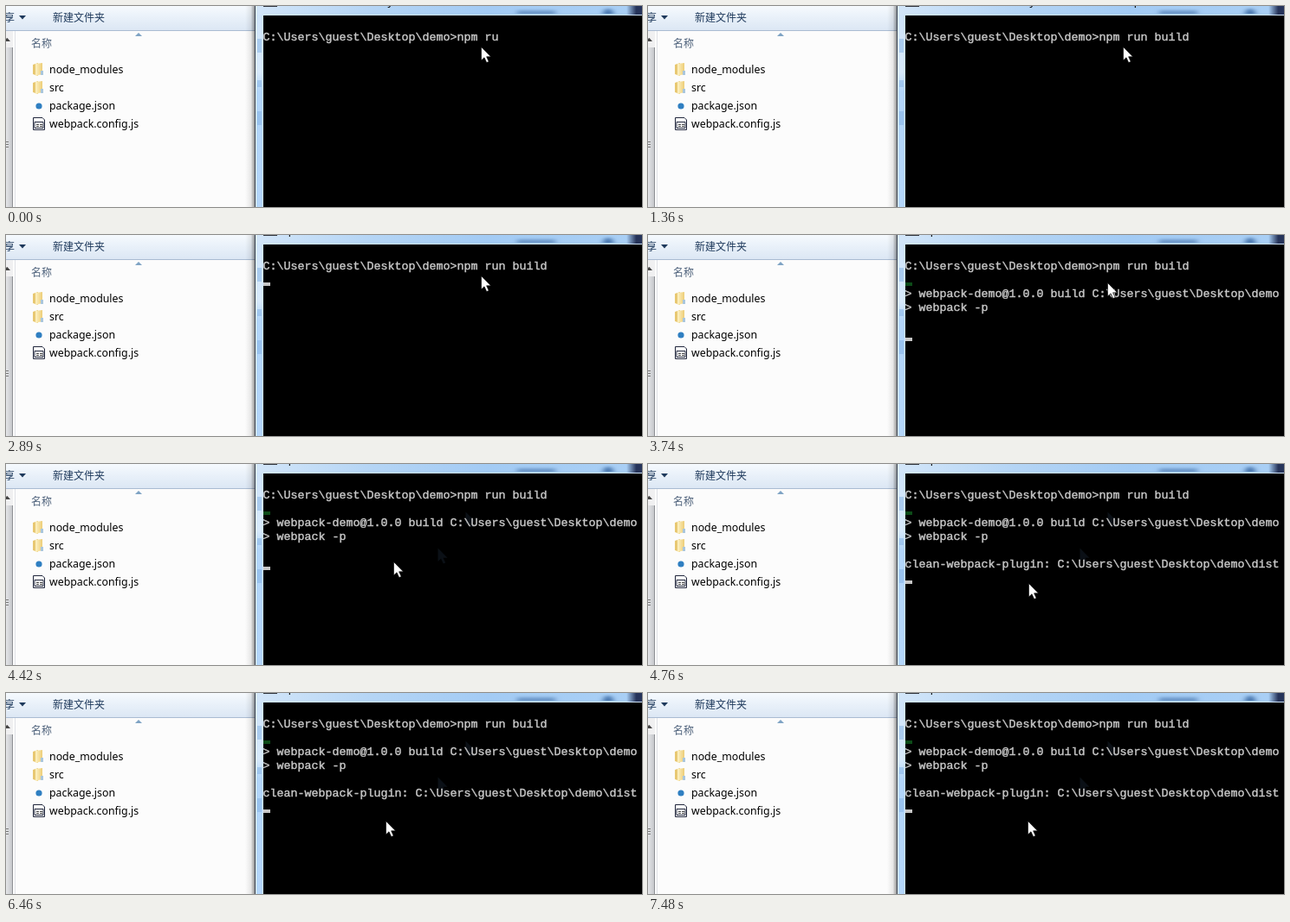
Animation of 734 by 233 pixels, one loop 7990 ms. Source, as an HTML page:

```html
<!DOCTYPE html>
<html lang="zh">
<head>
<meta charset="utf-8">
<title>npm run build</title>
<style>
html, body { margin: 0; width: 100%; height: 100%; overflow: hidden; background: #fff; }
svg { display: block; width: 734px; height: 233px; }
text { white-space: pre; }
.zh { font: 12px "Noto Sans CJK SC", "Noto Sans CJK", sans-serif; fill: #1e395b; }
.file { font: 12.35px "Noto Sans", sans-serif; fill: #000; }
.con { font: 13.333px "Liberation Mono", monospace; fill: #c6c6c6; stroke: #c6c6c6; stroke-width: .45px; }
</style>
</head>
<body>
<svg viewBox="0 0 734 233">
  <defs>
    <linearGradient id="bar" x2="0" y2="1">
      <stop stop-color="#f6fafe"/><stop offset=".5" stop-color="#e8f0f9"/><stop offset="1" stop-color="#dce7f4"/>
    </linearGradient>
    <linearGradient id="shade">
      <stop stop-color="#000" stop-opacity="0"/><stop offset=".6" stop-color="#000" stop-opacity=".08"/><stop offset="1" stop-color="#000" stop-opacity=".4"/>
    </linearGradient>
    <linearGradient id="glass">
      <stop stop-color="#d3e6f9"/><stop offset=".3" stop-color="#b5d5f5"/><stop offset=".6" stop-color="#a3cbf4"/><stop offset=".96" stop-color="#a9cff5"/><stop offset=".985" stop-color="#26345a"/>
    </linearGradient>
    <linearGradient id="side" x2="0" y2="1">
      <stop stop-color="#cfe4fa"/><stop offset=".3" stop-color="#d8eafb"/><stop offset=".4" stop-color="#b2d5f9"/><stop offset="1" stop-color="#b4d6fa"/>
    </linearGradient>
    <linearGradient id="thumb">
      <stop stop-color="#e4e5e8"/><stop offset="1" stop-color="#c6c8cc"/>
    </linearGradient>
    <linearGradient id="paper">
      <stop stop-color="#fdf2c4"/><stop offset="1" stop-color="#edcd77"/>
    </linearGradient>
    <filter id="blur"><feGaussianBlur stdDeviation="3 1.5"/></filter>
    <g id="folder">
      <path d="M1 2 7 0V15L1 13Z" fill="#e8c872"/>
      <path d="M4 1 12 0V13L4 15Z" fill="url(#paper)"/>
      <path d="M10 9H13V14H10Z" fill="#a9c6dd"/>
    </g>
    <path id="arrow" d="M.5 .5V16L4 12.8 6.7 18.6 9.2 17.5 6.6 11.8H11.5Z"/>
    <clipPath id="screen"><path d="M297 11H734V233H297Z"/></clipPath>
    <clipPath id="top"><path d="M288 0H734V9H288Z"/></clipPath>
  </defs>

  <!-- file list -->
  <path d="M0 0H288V233H0Z" fill="#fcfcfc"/>
  <path d="M0 0H288V28H0Z" fill="url(#bar)"/>
  <path d="M0 28.5H288" stroke="#a9bbd2"/>
  <path d="M0 29H8V233H0Z" fill="#f0f0f1"/>
  <path d="M0 48H7V233H0Z" fill="url(#thumb)"/>
  <path d="M7.5 48V233" stroke="#8f9195"/>
  <path d="M10.5 29V233" stroke="#dfe2e6"/>
  <path d="M0 41V38L1.5 37 5 41Z" fill="#444"/>
  <path d="M0 157.5H3M0 160.5H3M0 163.5H3" stroke="#777"/>
  <text class="zh" x="-2" y="18">享</text>
  <path d="M15 11H23L19 15.5Z" fill="#1e395b"/>
  <text class="zh" x="54" y="18">新建文件夹</text>
  <text class="zh" x="29" y="48" style="fill:#4c607a">名称</text>
  <path d="M149 35 153 31 157 35Z" fill="#7fa3c4"/>
  <use href="#folder" x="30" y="66"/>
  <use href="#folder" x="30" y="87"/>
  <circle cx="38" cy="116" r="3.6" fill="#2f7fc1"/>
  <path d="M31.5 129.5H42L44.5 132V143.5H31.5Z" fill="#fff" stroke="#20263c"/>
  <path d="M33 134.5H43V141.5H33Z" fill="#fff" stroke="#20263c"/>
  <path d="M35 137.5H42M35 139.5H42" stroke="#444" stroke-dasharray="3 1"/>
  <g id="files"></g>
  <path d="M276 0H287V233H276Z" fill="url(#shade)"/>

  <!-- console window -->
  <path d="M287 0H734V233H287Z" fill="url(#glass)"/>
  <path d="M288 10H297V233H288Z" fill="url(#side)"/>
  <path d="M287.5 0V233" stroke="#38424e"/>
  <path d="M288.5 0V233" stroke="#e6f3ff"/>
  <g clip-path="url(#top)" fill="#4c79b0" filter="url(#blur)">
    <path d="M590 5H634V12H590Z" opacity=".6"/>
    <circle cx="695" cy="9" r="6"/>
  </g>
  <path d="M290 38H295V54H290ZM290 86H295V94H290ZM290 122H295V138H290Z" fill="#7fb0e4" opacity=".5"/>
  <path d="M297 0H313V1H297Z" fill="#30343c"/>
  <text id="title" class="file" x="318" y="-1"></text>
  <path d="M296.5 233V10.5H734" fill="none" stroke="#cfe4f8"/>
  <path d="M297 11H734V233H297Z"/>
  <g clip-path="url(#screen)">
    <path id="trace" d="M297 55H305V59H297Z" fill="#0c4b18"/>
    <use id="ghost1" href="#arrow" x="530" y="55" fill="#0b1016"/>
    <use id="ghost2" href="#arrow" x="498" y="97" fill="#0b1016"/>
    <g id="lines"></g>
    <path id="caret" d="M297 0H305V4H297Z" fill="#c6c6c6"/>
    <use id="mouse" href="#arrow" fill="#fff" stroke="#000" stroke-width=".6"/>
  </g>
</svg>
<script>
const $ = id => document.getElementById(id);
const LOOP = 7990, TICK = 170;
const HOME = 'C:\\Users\\guest\\Desktop\\demo';
const CMD = 'C:\\Windows\\system32\\cmd.exe';

function addText(parent, cls, x, y, str) {
  const el = document.createElementNS('http://www.w3.org/2000/svg', 'text');
  el.setAttribute('class', cls);
  el.setAttribute('x', x);
  el.setAttribute('y', y);
  el.textContent = str;
  return $(parent).appendChild(el);
}

['node_modules', 'src', 'package.json', 'webpack.config.js']
  .forEach((name, i) => addText('files', 'file', 50, 78 + 21 * i, name));

const row = (n, str) => addText('lines', 'con', 296.5, 40 + 16 * n, str);
const prompt = row(0, '');
const output = [
  [3230, row(2, '> webpack-demo@1.0.0 build ' + HOME)],
  [3230, row(3, '> webpack -p')],
  [4760, row(5, 'clean-webpack-plugin: ' + HOME + '\\dist')]
];

// pointer stops: time, x, y
const path = [
  [3230, 548, 47], [3570, 541, 50], [3740, 530, 55], [4080, 498, 97],
  [4420, 447, 113], [4760, 439, 138], [4930, 438, 148]
];

function pointer(t) {
  const i = path.findIndex(p => p[0] > t);
  if (i === 0) return path[0].slice(1);
  if (i < 0) return path[path.length - 1].slice(1);
  const [t0, x0, y0] = path[i - 1], [t1, x1, y1] = path[i];
  const k = (t - t0) / (t1 - t0);
  return [x0 + (x1 - x0) * k, y0 + (y1 - y0) * k].map(Math.round);
}

function caretOn(t) {
  if (t < 1700) return false;
  if (t < 3230) return t < 2210 || t >= 2890;
  if (t < 4930) return true;
  return t >= 5440 && Math.floor((t - 5440) / 510) % 2 === 0;
}

const show = (el, on) => el.setAttribute('visibility', on ? 'visible' : 'hidden');

function draw(now) {
  const t = Math.floor(now % LOOP / TICK) * TICK;
  const typed = t < 170 ? 6 : t < 680 ? 7 : Math.min(13, 9 + (t - 680) / TICK);
  prompt.textContent = HOME + '>' + 'npm run build'.slice(0, typed);
  $('title').textContent = t >= 1700 ? 'npm' : '管理员: ' + CMD + (t >= 1360 ? ' - npm  run build' : '');
  output.forEach(([at, el]) => show(el, t >= at));

  show($('trace'), t >= 3230);
  show($('ghost1'), t >= 3910);
  show($('ghost2'), t >= 4250);
  show($('caret'), caretOn(t));
  $('caret').setAttribute('transform', `translate(0 ${t < 3230 ? 55 : t < 4760 ? 119 : 135})`);
  $('mouse').setAttribute('transform', `translate(${pointer(t)})`);
  requestAnimationFrame(draw);
}
draw(performance.now());
</script>
</body>
</html>
```
